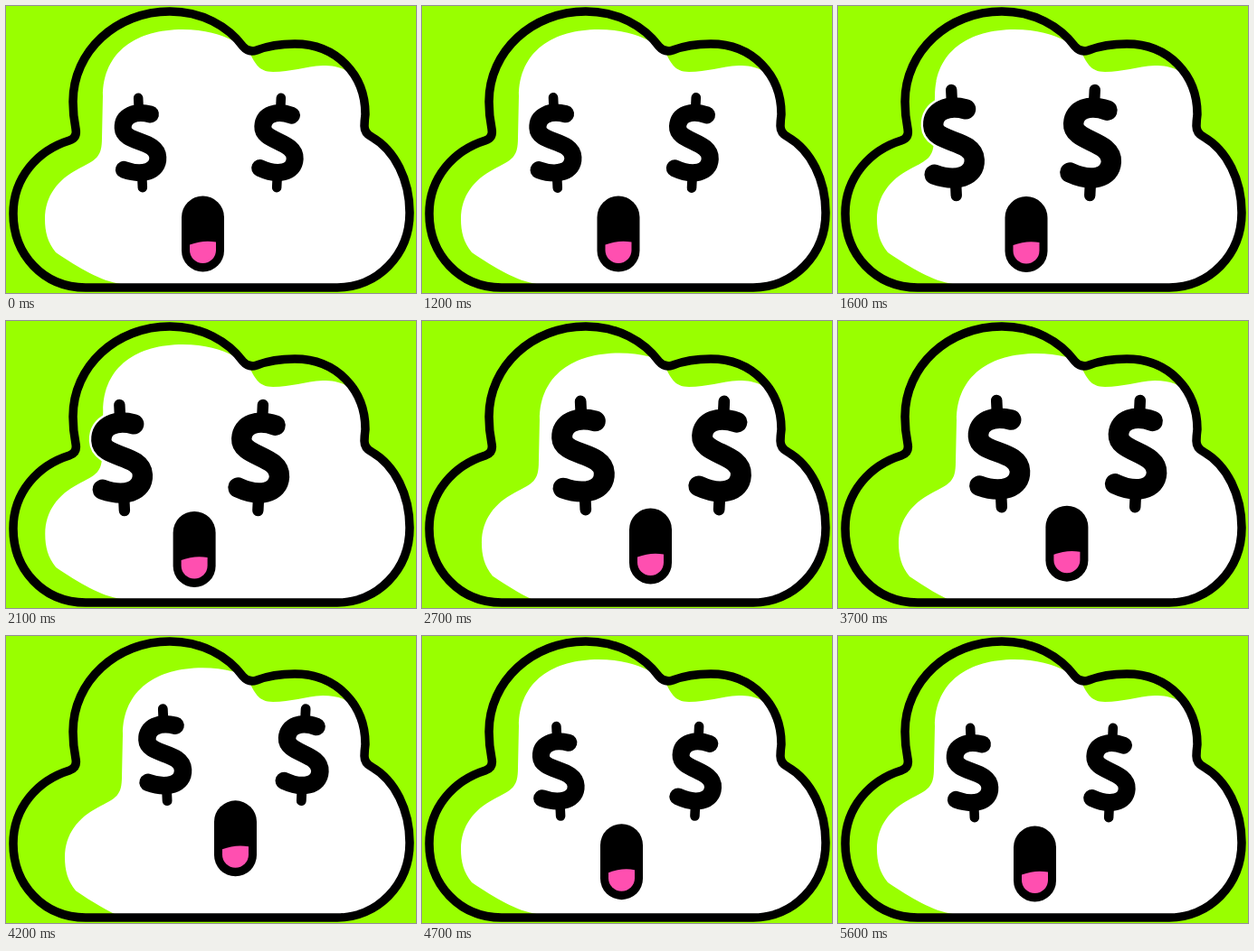
An HTML page that plays this animation: 453x318 px, repeating every 5.7 s.

```html
<!DOCTYPE html>
<html lang="en">
<head>
<meta charset="utf-8">
<title>Cloud with dollar eyes</title>
<style>
html, body { margin: 0; width: 100%; height: 100%; overflow: hidden; background: #9f0; }
svg { display: block; width: 453px; height: 318px; }
.line { fill: none; stroke: #000; stroke-linecap: round; stroke-linejoin: round; }
</style>
</head>
<body>
<svg viewBox="0 0 453 318">
  <defs>
    <path id="cloud" d="M88 312C41 312 8 275 8 230C8 190 35 160 70 149Q79 146 77 136C75 126 74 115 74 106C74 50 122 6 181 6C216 6 245 22 262 45Q268 52 277 49C290 44 305 42 319 42C365 42 397 76 397 120Q396 128 396 133Q396 141 404 145C430 160 446 193 446 229C446 276 410 312 366 312Z"/>
    <clipPath id="inside"><use href="#cloud"/></clipPath>
    <path id="s" d="M12.5 -31C-4 -36 -18.5 -31 -18.5 -17C-18.5 0 18.5 -3 18.5 17C18.5 33 0 37 -19.5 29"/>
    <path id="bars" d="M0 -49.7V-35M0 35V49.7"/>
    <g id="dollar" class="line">
      <use href="#s" stroke="#fff" stroke-width="23"/>
      <use href="#s" stroke-width="19"/>
      <use href="#bars" stroke-width="10.5"/>
    </g>
  </defs>
  <use href="#cloud" fill="#fff"/>
  <g clip-path="url(#inside)" fill="#9f0">
    <path id="shade" d="M127 308C105 305 80 290 55 273C46 262 43 250 43 236C43 210 58 192 79 181S106 168 106 146L107 100C107 50 145 26 195 26C220 26 238 32 250 38V-20H-40V308Z"/>
    <path d="M268 50C275 62 278 73 295 73C315 73 330 67 350 66C370 66 380 72 388 82V30H268Z"/>
  </g>
  <use href="#cloud" class="line" stroke-width="9.5"/>
  <use id="left" href="#dollar"/>
  <use id="right" href="#dollar"/>
  <g id="mouth">
    <rect x="-23.5" y="-42" width="47" height="84" rx="23.5"/>
    <path fill="#ff4fb0" d="M-14.5 12Q0 6.5 14.5 9V18A14.5 14.5 0 0 1 -14.5 18Z"/>
  </g>
</svg>
<script>
const LOOP = 5700, STEP = 100, EYE_GAP = 153, TILT = 2.7;

// Pose: eye x, eye y, eye scale, mouth x, mouth y
const rest = [148.5, 151.5, 1, 217.5, 252.5];
const lookLeft = [128, 151.5, 1.18, 208, 253];
const lookRight = [178, 149, 1.21, 252.5, 249.5];
const lookUp = [178, 130, 1.03, 256.5, 222];
const faceMoves = [
  [1130, 1600, lookLeft],
  [2080, 2700, lookRight],
  [3600, 4080, lookUp],
  [4060, 4840, rest]
];
const shadeMoves = [[2050, 2800, [24, 10]], [4100, 4640, [0, 0]]];

const ease = p => (1 - Math.cos(Math.PI * Math.min(1, Math.max(0, p)))) / 2;

function stateAt(t, start, moves) {
  return moves.reduce((state, [from, to, goal]) => {
    const k = ease((t - from) / (to - from));
    return state.map((v, i) => v + (goal[i] - v) * k);
  }, start);
}

function place(id, x, y, turn = 0, scale = 1) {
  document.getElementById(id).setAttribute("transform",
    `translate(${x} ${y}) rotate(${turn}) scale(${scale})`);
}

function draw(now) {
  const t = Math.floor(now % LOOP / STEP) * STEP;
  const [eyeX, eyeY, scale, mouthX, mouthY] = stateAt(t, rest, faceMoves);
  place("left", eyeX, eyeY, -TILT, scale);
  place("right", eyeX + EYE_GAP, eyeY, TILT, scale);
  place("mouth", mouthX, mouthY);
  place("shade", ...stateAt(t, [0, 0], shadeMoves));
}

const start = performance.now();
function tick() {
  draw(performance.now() - start);
  requestAnimationFrame(tick);
}
tick();
</script>
</body>
</html>
```
